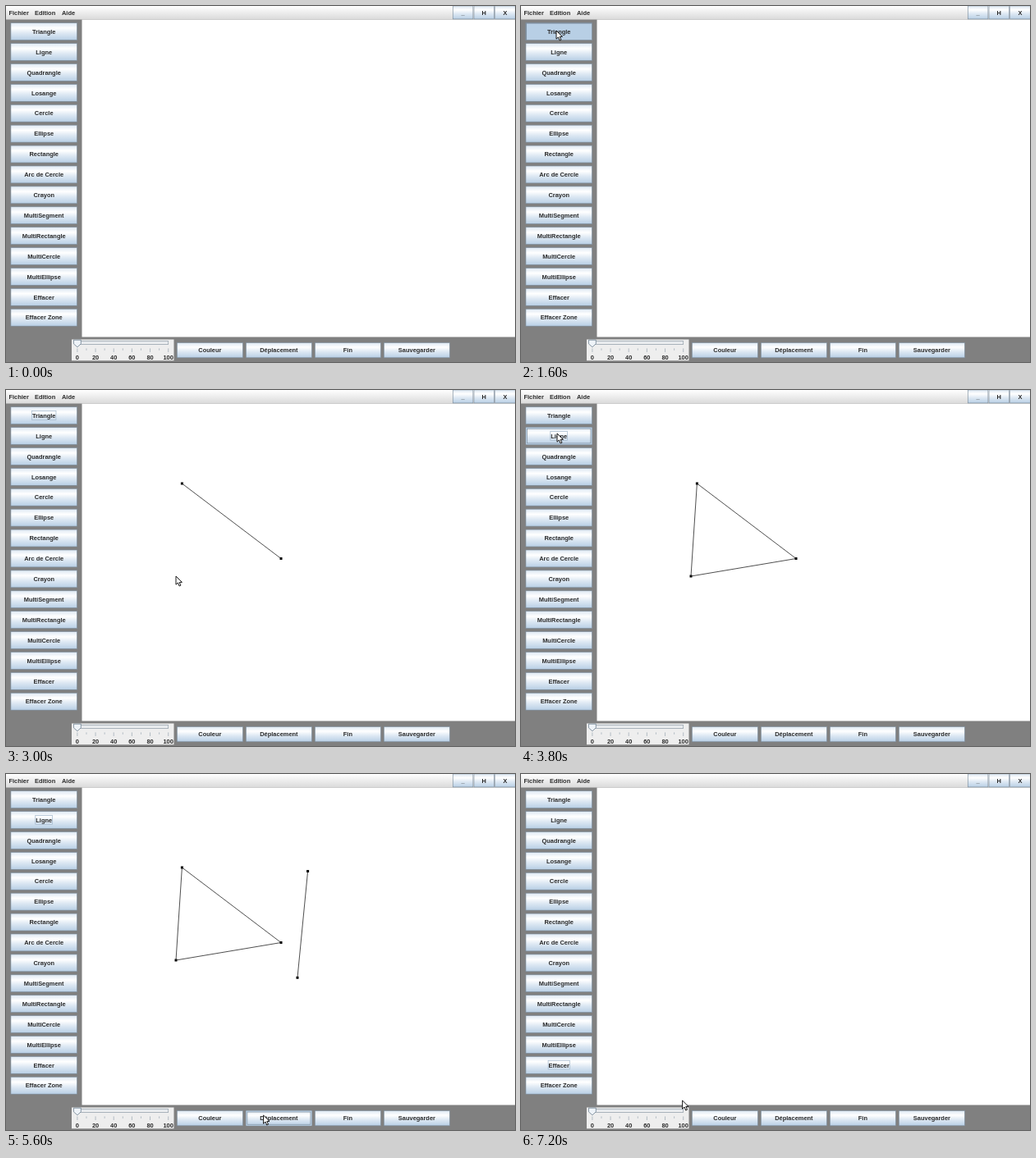
An HTML page that plays this animation: 620 px wide and 434 px high, repeating every 7.3 s.

```html
<!DOCTYPE html>
<html lang="fr">
<head>
<meta charset="utf-8">
<title>Dessin</title>
<style>
  html, body { margin: 0; width: 100%; height: 100%; overflow: hidden; background: #808080; }
  svg { display: block; width: 620px; height: 434px; }
  text { font: bold 7.45px "Liberation Sans", Arial, sans-serif; fill: #2b2b2b; text-anchor: middle; }
  .menu text { text-anchor: start; }
  .face { fill: url(#ocean); stroke: #7a8a99; stroke-width: .62; }
  .glow { fill: none; stroke: #b8cfe5; stroke-width: 1.3; visibility: hidden; }
  .rim { fill: none; stroke: #7a8a99; stroke-width: .62; visibility: hidden; }
  .sunk { fill: none; stroke: #7a8a99; stroke-width: 1.24; visibility: hidden; }
  .focus { fill: none; stroke: #a3b8cc; stroke-width: .7; visibility: hidden; }
  .hover .glow, .hover .rim, .focused .focus, .pressed .sunk { visibility: visible; }
  .pressed .face { fill: #b8cfe5; }
  .ink { stroke: #222; stroke-width: .8; fill: none; }
  .dot { fill: #000; }
</style>
</head>
<body>
<svg id="stage" viewBox="0 0 620 434">
  <defs>
    <linearGradient id="ocean" x2="0" y2="1">
      <stop offset="0" stop-color="#dde8f3"/>
      <stop offset=".3" stop-color="#fff"/>
      <stop offset=".6" stop-color="#dde8f3"/>
      <stop offset="1" stop-color="#b8cfe5"/>
    </linearGradient>
    <linearGradient id="bar" x2="0" y2="1">
      <stop offset="0" stop-color="#fff"/>
      <stop offset="1" stop-color="#dadada"/>
    </linearGradient>
  </defs>
  <rect width="620" height="434" fill="#808080"/>
  <rect x="92.5" y="16.5" width="527.5" height="387" fill="#fff"/>
  <g class="menu">
    <rect width="620" height="16.5" fill="url(#bar)"/>
    <text x="3.4" y="11">Fichier</text>
    <text x="35" y="11">Edition</text>
    <text x="68" y="11">Aide</text>
  </g>
  <g id="buttons"></g>
  <g id="slider">
    <rect x="80" y="406.5" width="124.5" height="25.8" fill="#eee"/>
    <rect x="87" y="408.7" width="110.7" height="3.6" fill="#f4f4f4" stroke="#7a8a99" stroke-width=".62"/>
    <path d="M87.3 410.3H197.4" stroke="#d5dde6" stroke-width=".8"/>
    <path d="M82.4 407.2H91.3V411.8L86.9 415.8 82.4 411.8Z" fill="#eef3f8" stroke="#65788a" stroke-width=".75"/>
  </g>
  <g id="drawing"></g>
  <path id="cursor" d="M0 0V10.2L2.4 8 4.1 12 5.9 11.2 4.2 7.4H7.4Z" fill="#fff" stroke="#000" stroke-width=".9"/>
</svg>
<script>
const LOOP = 7300, STEP = 100;
const $ = id => document.getElementById(id);

function add(parent, tag, attrs, label) {
  const el = document.createElementNS('http://www.w3.org/2000/svg', tag);
  for (const key in attrs) el.setAttribute(key, attrs[key]);
  if (label !== undefined) el.textContent = label;
  return parent.appendChild(el);
}

const buttons = [];
function addButton(label, x, y, width, height) {
  const g = add($('buttons'), 'g', {});
  const inset = (name, d) => add(g, 'rect', {
    class: name, x: x + d, y: y + d, width: width - 2 * d, height: height - 2 * d
  });
  inset('face', .3);
  inset('glow', 1.1);
  inset('rim', 1.9);
  add(g, 'path', { class: 'sunk', d: `M${x + .6} ${y + height}V${y + .6}H${x + width}` });
  const cx = x + width / 2, cy = y + height / 2;
  const text = add(g, 'text', { x: cx, y: cy + 2.7 }, label);
  const w = text.getComputedTextLength() + 1;
  add(g, 'rect', { class: 'focus', x: cx - w / 2, y: cy - 5.6, width: w, height: 10.8 });
  buttons.push({ g, label, x, y, width, height });
}

['Triangle', 'Ligne', 'Quadrangle', 'Losange', 'Cercle', 'Ellipse', 'Rectangle',
 'Arc de Cercle', 'Crayon', 'MultiSegment', 'MultiRectangle', 'MultiCercle',
 'MultiEllipse', 'Effacer', 'Effacer Zone']
  .forEach((label, i) => addButton(label, 5.6, 20.4 + 24.9 * i, 81.2, 21.5));
['Couleur', 'Déplacement', 'Fin', 'Sauvegarder']
  .forEach((label, i) => addButton(label, 208 + 84 * i, 410.2, 80.8, 18.9));
['_', 'H', 'X'].forEach((label, i) => addButton(label, 544 + 25.7 * i, -.4, 25.2, 16.6));

for (let v = 0; v <= 100; v += 10) {
  const x = 86.9 + v * 1.108, major = v % 20 === 0;
  add($('slider'), 'path', { d: `M${x} 417.4v${major ? 4.6 : 2.4}`, stroke: '#8c9aa8', 'stroke-width': .6 });
  if (major) add($('slider'), 'text', { x, y: 430.6 }, v);
}

// Places where the pointer rests; a click presses a button or sets a corner.
const stops = [
  { from: 800, to: 800, at: [600, 420] },
  { from: 1500, to: 1800, at: [43, 30], click: 1600, press: 'Triangle' },
  { from: 2000, to: 2200, at: [214.4, 114], click: 2100 },
  { from: 2400, to: 2600, at: [335, 205.5], click: 2600 },
  { from: 2800, to: 3200, at: [207, 227], click: 3100 },
  { from: 3500, to: 3900, at: [44, 53], click: 3600, press: 'Ligne' },
  { from: 4200, to: 4400, at: [367.6, 118.5], click: 4300 },
  { from: 4600, to: 4900, at: [355, 248.3], click: 4700 },
  { from: 5200, to: 5200, at: [253, 380] },
  { from: 5400, to: 5700, at: [313.6, 416] },
  { from: 6000, to: 6500, at: [50.7, 351], click: 6200, press: 'Effacer' },
  { from: 6900, to: 6900, at: [256, 407] },
  { from: 7200, to: LOOP, at: [196.6, 398] }
];
const presses = stops.filter(s => s.press);
const clearTime = presses.find(s => s.press === 'Effacer').click + STEP;

const shapes = [];
const draw = (start, tag, attrs) => shapes.push({ start, el: add($('drawing'), tag, attrs) });
const line = (start, a, b) => draw(start, 'path', { class: 'ink', d: `M${a}L${b}` });

let tool, corners;
for (const { click, press, at } of stops) {
  if (press) { tool = press; corners = []; }
  else if (click) {
    const [x, y] = at;
    draw(click, 'rect', { class: 'dot', x: x - 1.5, y: y - 1.5, width: 3, height: 3 });
    if (corners.length) line(click, corners[corners.length - 1], at);
    corners.push(at);
    if (tool === 'Triangle' && corners.length === 3) line(click, at, corners[0]);
  }
}

function pointerAt(t) {
  const i = stops.findIndex(s => t <= s.to), next = stops[i];
  if (t >= next.from) return next.at;
  if (i === 0) return [-50, -50];
  const last = stops[i - 1];
  const k = (t - last.to) / (next.from - last.to), ease = k * k * (3 - 2 * k);
  return last.at.map((v, axis) => v + (next.at[axis] - v) * ease);
}

function render(t) {
  const [x, y] = pointerAt(t);
  $('cursor').setAttribute('transform', `translate(${x} ${y})`);

  const focus = presses.filter(s => t > s.click).pop();
  for (const b of buttons) {
    const pressed = presses.some(s => s.press === b.label && s.click === t);
    const over = x >= b.x && x <= b.x + b.width && y >= b.y && y <= b.y + b.height;
    b.g.classList.toggle('pressed', pressed);
    b.g.classList.toggle('hover', over && !pressed);
    b.g.classList.toggle('focused', !!focus && focus.press === b.label);
  }
  for (const s of shapes)
    s.el.style.visibility = t >= s.start && t < clearTime ? 'visible' : 'hidden';
}

const begin = performance.now();
function tick() {
  const t = (performance.now() - begin) % LOOP;
  render(Math.floor(t / STEP) * STEP);
  requestAnimationFrame(tick);
}
tick();
</script>
</body>
</html>
```
